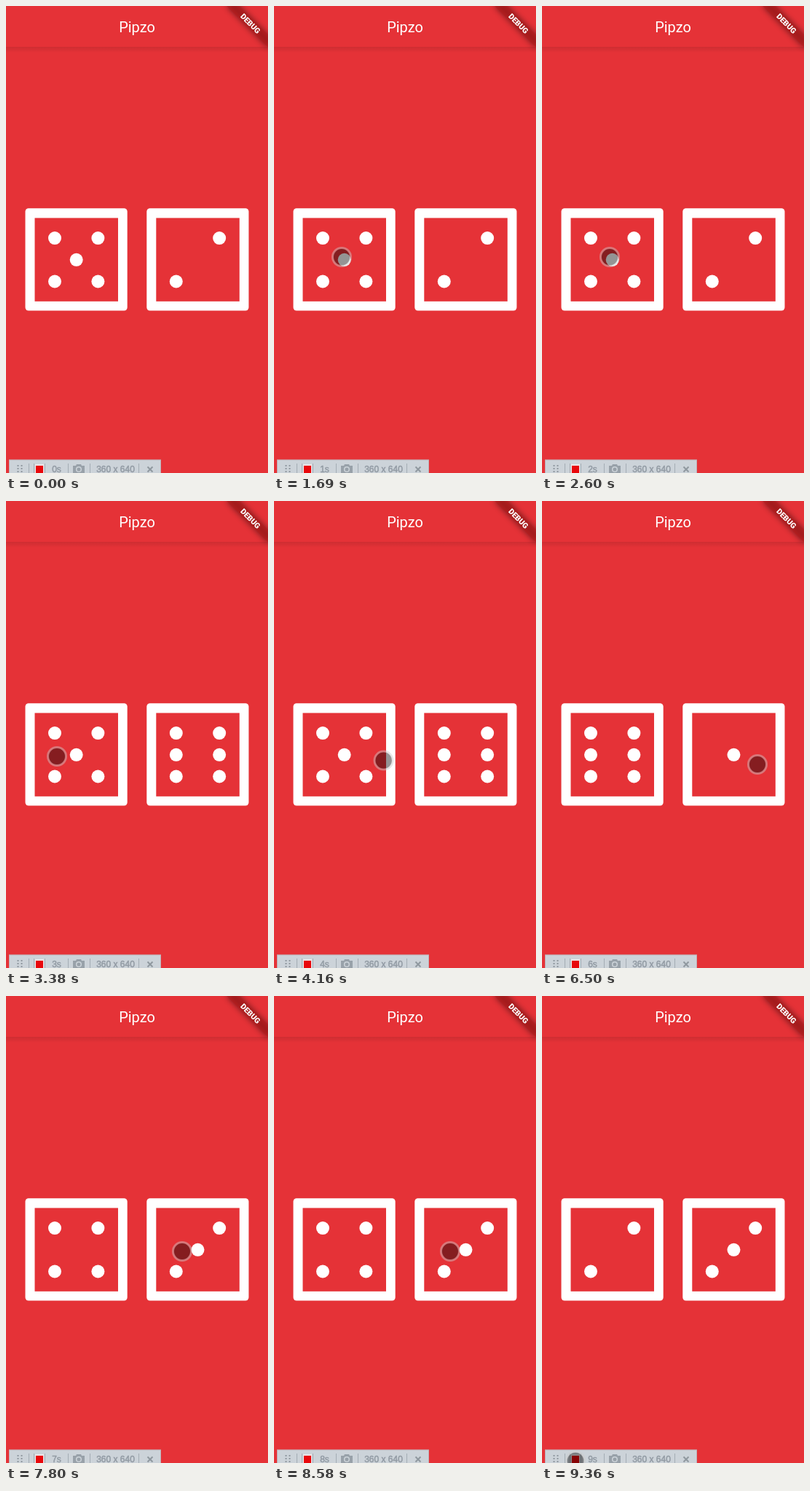
Write an HTML page that moves like this. It is 360 px wide and 640 px high and loops after 9620 ms.

```html
<!DOCTYPE html>
<html lang="en">
<head>
<meta charset="utf-8">
<title>Dice</title>
<style>
html, body { margin: 0; width: 100%; height: 100%; overflow: hidden; background: #e53237; }
svg { display: block; width: 360px; height: 640px; }
.title { font: 400 20px Roboto, sans-serif; fill: #fff; }
.debug { font: 900 10.5px Roboto, sans-serif; fill: #fff; }
.bar text { font: 12px "Liberation Sans", Arial, sans-serif; fill: #929ba4; stroke: #929ba4; stroke-width: .5; }
</style>
</head>
<body>
<svg viewBox="0 0 360 640" text-anchor="middle">
  <defs>
    <linearGradient id="shade" x2="0" y2="1">
      <stop stop-opacity=".1"/>
      <stop offset="1" stop-opacity="0"/>
    </linearGradient>
    <filter id="blur" x="-30%" y="-100%" width="160%" height="300%">
      <feGaussianBlur stdDeviation="4"/>
    </filter>
  </defs>
  <rect width="360" height="640" fill="#e53237"/>
  <rect y="56" width="360" height="8" fill="url(#shade)"/>
  <text class="title" x="180" y="36">Pipzo</text>

  <g transform="translate(360 0) rotate(45)">
    <rect x="-40" y="28" width="80" height="12" opacity=".5" filter="url(#blur)"/>
    <rect x="-40" y="28" width="80" height="12" fill="#b71c1c" fill-opacity=".627"/>
    <text class="debug" y="37.8">DEBUG</text>
  </g>

  <g id="dice" fill="#fff"></g>

  <g class="bar">
    <rect x="4.5" y="622" width="208" height="20" fill="#ccd3d9" stroke="#bfb4ba"/>
    <path d="M16.5 629v10M21.5 629v10" stroke="#8f989f" stroke-width="2" stroke-dasharray="2 2"/>
    <path d="M31.5 627v13m7-13v13m15-13v13m32-13v13m30-13v13m67-13v13" stroke="#a4adb4"/>
    <rect x="40" y="628" width="12" height="12" fill="#efe4e6"/>
    <rect x="41" y="630" width="10" height="10" fill="#e8080c"/>
    <text id="clock" x="69.5" y="638.5">0s</text>
    <path d="M92 630h4l1-2h6l1 2h4v10h-16z" fill="#98a1a9"/>
    <circle cx="100" cy="635" r="3.3" fill="none" stroke="#ccd3d9" stroke-width="1.5"/>
    <text x="150.5" y="638.5">360 x 640</text>
    <path d="M194.5 631.5l7 7m0-7l-7 7" stroke="#8f989f" stroke-width="2"/>
  </g>

  <g id="cursor">
    <circle r="11.5" fill-opacity=".42"/>
    <circle r="12.5" fill="none" stroke="#ccc" stroke-opacity=".45" stroke-width="3"/>
  </g>
</svg>
<script>
const LOOP = 9620, STEP = 130, GLIDE = 6 * STEP;

// each glide: start time, where it ends, the dice rolled on arrival
const glides = [
  { at: 260, x: 93, y: 344, roll: [5, 2] },
  { at: 2600, x: 70, y: 350, roll: [5, 6] },
  { at: 3510, x: 157, y: 356, roll: [2, 3] },
  { at: 5200, x: 296, y: 361, roll: [6, 1] },
  { at: 7020, x: 242, y: 350, roll: [4, 3] },
  { at: 8580, x: 46, y: 637, roll: [2, 3] }
];

const get = id => document.getElementById(id);
const dice = get('dice'), clock = get('clock'), cursor = get('cursor');
const ease = k => k * k * (3 - 2 * k);

// does a die showing n have a pip at this column and row (-1 to 1)?
function hasPip(n, col, row) {
  if (!col) return !row && n % 2;
  if (!row) return n === 6;
  return col * row < 0 ? n > 1 : n > 3;
}

function die(x, n) {
  let svg = `<g transform="translate(${x} 277.3)"><rect width="140.2" height="140.2" rx="4.5"/>
    <rect x="13" y="13.2" width="114.5" height="114.3" fill="#e53237"/>`;
  for (let col = -1; col < 2; col++)
    for (let row = -1; row < 2; row++)
      if (hasPip(n, col, row))
        svg += `<circle cx="${70.2 + col * 29.7}" cy="${70.5 + row * 29.7}" r="9"/>`;
  return svg + '</g>';
}

function draw(now) {
  const t = Math.floor(now % LOOP / STEP) * STEP;
  let [x, y] = [46, 637], roll = glides[0].roll;
  for (const g of glides.filter(g => g.at <= t)) {
    const k = Math.min(1, (t - g.at) / GLIDE);
    x += (g.x - x) * ease(k);
    y += (g.y - y) * ease(k);
    if (k === 1) roll = g.roll;
  }
  dice.innerHTML = die(26.5, roll[0]) + die(193.3, roll[1]);
  clock.textContent = Math.floor(t / 1000) + 's';
  cursor.setAttribute('visibility', t < glides[0].at ? 'hidden' : 'visible');
  cursor.setAttribute('transform', `translate(${x} ${y})`);
}

const start = performance.now();
function tick() {
  draw(performance.now() - start);
  requestAnimationFrame(tick);
}
tick();
</script>
</body>
</html>
```
